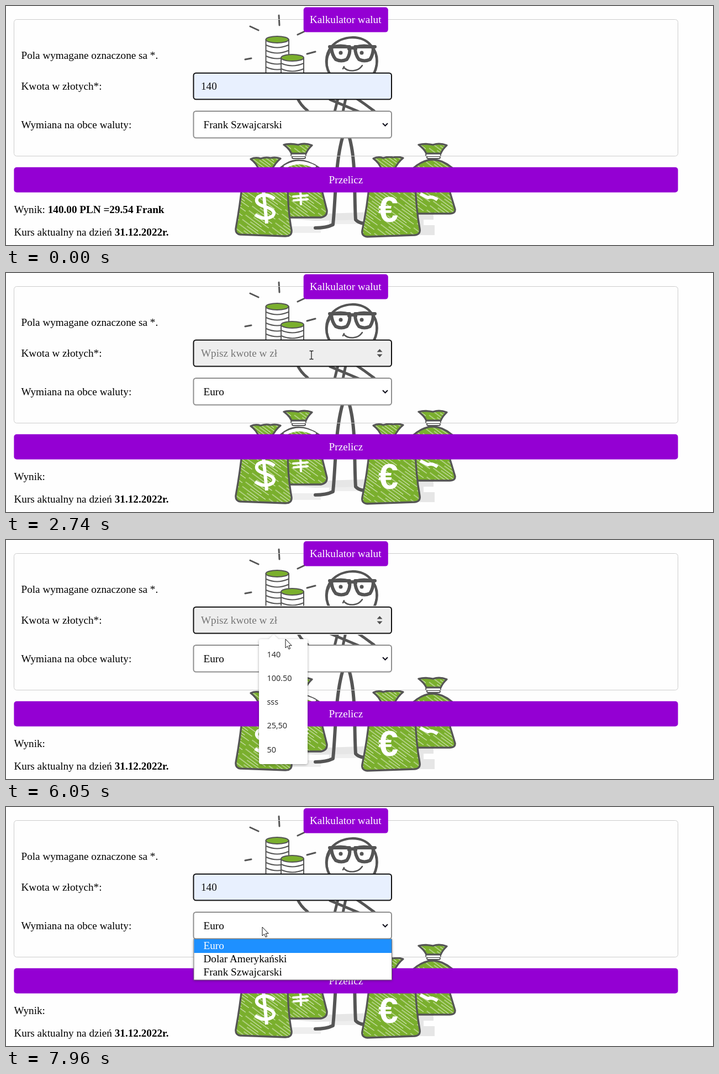
Animation of 1280 by 434 pixels, one loop 8 s. Source, as an HTML page:

```html
<!DOCTYPE html>
<html lang="pl">
<head>
<meta charset="utf-8">
<title>Kalkulator walut</title>
<style>
html, body { margin: 0; width: 100%; height: 100%; overflow: hidden; background: #fefefe; }
svg { display: block; width: 1280px; height: 434px; font: 19.2px "Liberation Serif", "Times New Roman", serif; }
.ink { stroke: #555; fill: none; stroke-linecap: round; stroke-linejoin: round; }
.sack { stroke: #555; stroke-width: 3.3; fill: url(#hatch); stroke-linejoin: round; }
.chalk { stroke: #fff; fill: none; stroke-width: 6; }
.sign { font: bold 65px "Liberation Sans", Arial, sans-serif; fill: #fff; text-anchor: middle; }
.ui { font: 14.4px "Open Sans", "Noto Sans", sans-serif; fill: #222; }
.mid { text-anchor: middle; }
</style>
</head>
<body>
<svg viewBox="0 0 1280 434">
  <defs>
    <pattern id="hatch" width="52" height="10" patternUnits="userSpaceOnUse" patternTransform="rotate(36)">
      <path fill="#7aaf2d" d="M0 0h52v10H0z"/>
      <path stroke="#fff" d="M2 2L38 2.500M16 7L50 6.600" stroke-width=".8"/>
    </pattern>
    <filter id="shade" x="-20%" y="-20%" width="140%" height="140%">
      <feDropShadow dx="0" dy="1" stdDeviation="2" flood-opacity=".35"/>
    </filter>
    <g id="frontTop"><path class="sack" d="M443 278q9-4 18-1q9-3 18-1q9-2 18 1q-10 8-16 21h-23q-4-12-15-20z"/></g>
    <g id="backTop">
      <path class="sack" d="M503 252q12-3 26 0q12-4 25 1q-7 6-11 15h-26q-4-9-14-16z"/>
      <rect x="516" y="268.500" width="27" height="4.500" rx="2" fill="#fff" stroke="#555" stroke-width="1.800"/>
      <rect x="518" y="273" width="24" height="4" rx="2" fill="#fff" stroke="#555" stroke-width="1.800"/>
    </g>
  </defs>

  <!-- Background drawing -->
  <path fill="#e6e6e6" d="M510 386L580 377L668 374V388L560 390zM735 378L774 374V388H756V398H776V416H735z"/>
  <path fill="#eee" d="M512 400h58v12h-58zM585 389h62v7h-62z"/>
  <g class="ink" stroke-width="3">
    <path d="M442 37l15 7M494 17l1 18M528 52l17-8M433 97l11-2M545 87l15-4"/>
    <g stroke-width="2">
      <path fill="#fff" d="M470.500 61V124H512V61z"/>
      <path d="M471 71q20 9 40 0M471 81q20 9 40 0M471 91q20 9 40 0M471 101q20 9 40 0M471 111q20 9 40 0"/>
      <ellipse cx="491" cy="61" rx="20.500" ry="6" fill="#7aaf2d"/>
      <path fill="#fff" d="M498 94V124H539V94z"/>
      <path d="M498 104q20 9 41 0M498 114q20 9 41 0"/>
      <ellipse cx="518.500" cy="94" rx="20.500" ry="6" fill="#7aaf2d"/>
    </g>
    <path fill="#fff" stroke-width="4.500" d="M591 130C576 112 577 88 590 73C608 53 645 51 661 72C676 88 674 112 662 130"/>
    <path stroke-width="2" d="M586 122C579 107 581 92 588 82M669 90q4 16-4 32"/>
    <g stroke-width="6">
      <path fill="#fff" d="M589 75q17-5 33 0q2 12-5 22q-10 5-20 0q-7-8-8-22zM632 75q16-5 33 0q0 13-6 22q-10 5-20 0q-7-9-7-22z"/>
      <path d="M586 74h36M632 74h36M621 78q6-4 12 0"/>
    </g>
    <path stroke-width="2.500" d="M612 112c8 8 25 8 33-4M612 110l-2 4"/>
    <g fill="#555" stroke="none"><circle cx="606" cy="85" r="3.500"/><circle cx="644" cy="85" r="3.500"/></g>
    <path stroke-width="5" d="M527 166q6 14 19 24M587 170l52 22M601 168l-6 24M615 168l-5 24M632 166q18 12 35 25"/>
    <path stroke-width="6" d="M610 236C596 282 597 350 592 397Q580 403 560 403M621 236C634 280 630 340 633 388Q638 394 649 395"/>
  </g>
  <path class="sack" d="M497 294q30-27 70 0l6 45l8 32q1 11-11 13h-70z"/>
  <path class="chalk" d="M504 293q26-17 56 0"/>
  <path class="chalk" stroke-linecap="round" style="stroke-width:4" d="M520 346l26-2M521 353l25-2M533 336l1 24"/>
  <use href="#backTop"/>
  <path class="sack" d="M738 294q34-30 70 0l-4 45l9 30q1 8-10 8h-63z"/>
  <path class="chalk" d="M750 341l14 7q8-3 17 4"/>
  <use href="#backTop" x="244"/>
  <use href="#frontTop"/>
  <path class="sack" d="M428 320Q424 360 416 404Q415 414 424 415L506 418Q518 418 517 407Q510 370 510 320z"/>
  <path class="chalk" d="M486 350Q470 338 456 347Q448 358 468 364Q491 371 483 381Q469 391 451 379M466 334L472 395"/>
  <use href="#frontTop" x="222" y="-1"/>
  <path class="sack" d="M658 320Q654 365 645 407Q643 418 654 419L740 416Q751 415 749 404Q742 366 741 320z"/>
  <text class="sign" x="692" y="392">€</text>

  <!-- Form -->
  <rect x="14.500" y="24.500" width="1202" height="248" rx="5" fill="none" stroke="#ccc"/>
  <rect x="538.700" y="2.200" width="153.100" height="45.400" rx="5" fill="#9400d3"/>
  <text x="550" y="31" fill="#fff">Kalkulator walut</text>
  <text x="27.500" y="96.300">Pola wymagane oznaczone sa *.</text>
  <text x="27.500" y="152">Kwota w złotych*:</text>
  <text x="27.500" y="222">Wymiana na obce waluty:</text>
  <rect id="ring" x="337" y="119.500" width="363.500" height="52.500" rx="6" fill="#fff"/>
  <rect id="field" x="339.500" y="121.700" width="358.500" height="47.800" rx="4.500" stroke="#101010" stroke-width="2"/>
  <text id="amount" x="353" y="152"></text>
  <path id="caret" stroke="#000" d="M0 136v20"/>
  <g id="spin">
    <rect x="669" y="136" width="16" height="19" rx="3" fill="#efefef"/>
    <path fill="#505050" d="M671.500 143.500h10l-5-5.500zM671.500 147.500h10l-5 5.500z"/>
  </g>
  <rect x="339.500" y="191" width="358.500" height="48.500" rx="4.500" fill="#fff" stroke="#8f8f8f" stroke-width="2"/>
  <text id="currency" x="357.500" y="222"></text>
  <path d="M682 213l4.500 4.500l4.500-4.500" fill="none" stroke="#10101c" stroke-width="2"/>
  <rect id="button" x="14.400" y="292.700" width="1202.200" height="45.800" rx="5"/>
  <text class="mid" x="615.500" y="321.500" fill="#fff">Przelicz</text>
  <text x="14.500" y="375.500">Wynik: <tspan id="result" font-weight="bold">140.00 PLN =29.54 Frank</tspan></text>
  <text x="14.500" y="417">Kurs aktualny na dzień <tspan font-weight="bold">31.12.2022r.</tspan></text>

  <!-- Overlays -->
  <g id="popup">
    <path fill="#fff" filter="url(#shade)" d="M461 180h15l8.500-8l8.500 8h49q4 0 4 4V403q0 4-4 4H462q-4 0-4-4V184q0-4 4-4z"/>
    <rect id="hover" x="458" y="187" width="88" height="41" fill="#ededed"/>
    <g id="items" class="ui"></g>
  </g>
  <g id="tip">
    <rect x="539" y="161.500" width="127" height="29.500" fill="#fff" stroke="#666"/>
    <text class="ui" x="548" y="181" style="font-size:14px;fill:#575757">Wypełnij to pole.</text>
  </g>
  <g id="list">
    <rect x="340" y="240" width="358.500" height="74" fill="#fff" stroke="#707070" filter="url(#shade)"/>
    <path fill="#1e90ff" d="M340.500 240h357.500v25h-357.500z"/>
    <text x="357.500" y="258" fill="#fff">Euro</text>
    <text x="357.500" y="282">Dolar Amerykański</text>
    <text x="357.500" y="306">Frank Szwajcarski</text>
  </g>
  <path id="arrow" d="M0 0V16l3.600-3.300l2.400 5.500l2.600-1.100l-2.400-5.400h5z" fill="#fff" stroke="#111"/>
  <path id="beam" d="M-3.500-7.500h2.500l1 1l1-1h2.500M0-6.500V6.500M-3.500 7.500h2.500l1-1l1 1h2.500" fill="none" stroke="#222" stroke-width="1.300"/>
</svg>
<script>
const $ = id => document.getElementById(id);
const show = (id, on) => $(id).setAttribute('opacity', +on);
const at = (id, x, y) => $(id).setAttribute('transform', `translate(${x} ${y})`);
const between = (v, a, b) => v >= a && v < b;

$('items').innerHTML = ['140', '100.50', 'sss', '25,50', '50']
  .map((s, i) => `<text x="472.500" y="${212.5 + i * 43.3}">${s}</text>`).join('');

// Pointer moves: first step, last step, step count, end point
const moves = [
  [260, 470, 4, 664, 130], [730, 1010, 5, 1045, 376], [1270, 1340, 2, 1135, 450],
  [1870, 1870, 1, 1186, 416], [2000, 2000, 1, 1200, 450],
  [2240, 2520, 5, 640, 98], [2600, 2740, 3, 553, 149], [2870, 3010, 3, 552, 147],
  [3070, 3070, 1, 551, 146], [3480, 3750, 5, 515, 176], [3820, 4160, 5, 529, 145],
  [5640, 6050, 6, 506, 180], [6180, 6390, 4, 497, 197], [7050, 7810, 10, 464, 218]
];

function pointer(t) {
  let x = 1280, y = 450;
  for (const [a, b, n, ex, ey] of moves) {
    if (t < a) break;
    const k = n === 1 ? 1 : Math.min(n, 1 + Math.floor((t - a) / (b - a) * (n - 1) + 1e-6)) / n;
    x += (ex - x) * k;
    y += (ey - y) * k;
  }
  return [x, y];
}

function popupAlpha(t) {
  if (t < 2870 || t >= 6720) return 0;
  if (t < 6520) return Math.min(1, Math.floor((t - 2870) / 70 + 1) / 3);
  return (1 - Math.floor((t - 6520) / 65 + 1) / 4) ** 2;
}

function draw(t) {
  const [x, y] = pointer(t);
  const inField = between(x, 339, 699) && between(y, 121, 171);
  const preview = between(t, 6180, 6520) && y >= 187;
  const filled = t < 1870 || t >= 6520 || preview;
  const open = between(t, 2600, 7880);

  $('field').setAttribute('fill', filled ? '#e8f0fe' : '#eee');
  $('amount').textContent = filled ? '140' : 'Wpisz kwote w zł';
  $('amount').setAttribute('fill', filled ? '#111' : '#757575');
  $('currency').textContent = t < 1870 ? 'Frank Szwajcarski' : 'Euro';
  $('result').style.visibility = t < 1870 ? 'visible' : 'hidden';
  $('button').setAttribute('fill', between(x, 14, 1217) && between(y, 292, 339) ? '#a300e8' : '#9400d3');

  show('ring', between(t, 2870, 7880));
  show('spin', inField || open);
  const blinkFrom = t < 6520 ? 2970 : 6520;
  show('caret', between(t, 2970, 7880) && !preview && (t - blinkFrom) % 1060 < 530);
  at('caret', filled ? 381.5 : 353.5, 0);

  const alpha = popupAlpha(t), s = .95 + .05 * alpha;
  show('popup', alpha);
  $('popup').setAttribute('transform', `translate(501 291) scale(${s}) translate(-501 -291)`);
  show('hover', between(t, 6180, 6720) && y >= 187);
  show('tip', between(t, 4700, 5640) ? (t < 4830 ? .92 : 1) : 0);
  show('list', t < 7880 ? 0 : t < 7960 ? .6 : 1);

  show('arrow', !inField);
  show('beam', inField);
  at('arrow', x, y);
  at('beam', x, y);
}

function loop() {
  draw(performance.now() % 8000);
  requestAnimationFrame(loop);
}
loop();
</script>
</body>
</html>
```
